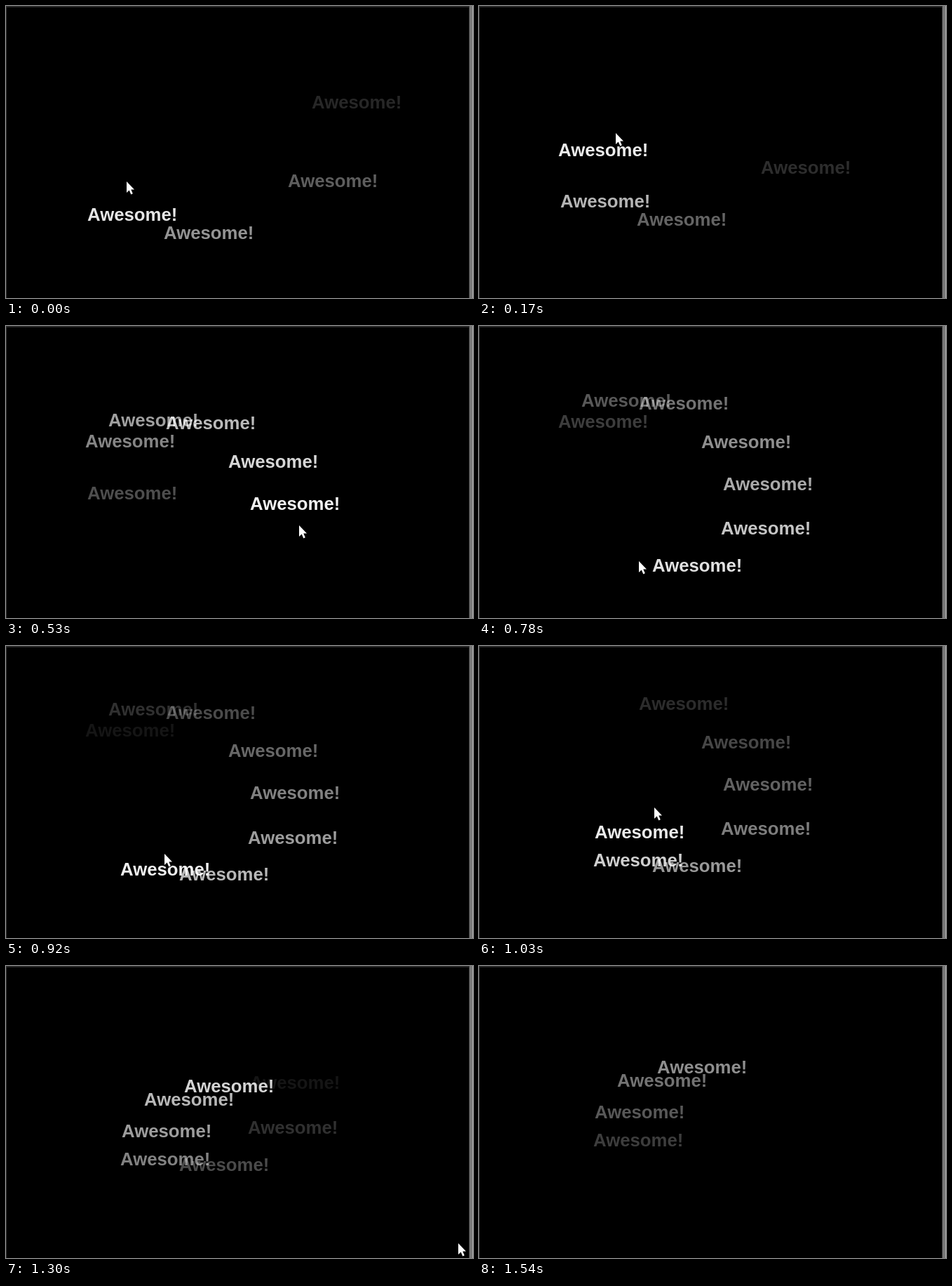
An HTML page with a canvas for the animation above (1570 ms loop, 666 by 416 pixels).

```html
<!DOCTYPE html>
<html lang="en">
<head>
<meta charset="utf-8">
<title>Awesome trail</title>
<style>
  html, body { margin: 0; width: 100%; height: 100%; overflow: hidden; background: #000; }
  canvas { display: block; }
</style>
</head>
<body>
<canvas id="stage" width="666" height="416"></canvas>
<script>
const ctx = document.getElementById('stage').getContext('2d');
const LOOP = 1570, BEAT = 95, OFFSET = 10;
const LIFE = 888, RISE = 100, FAINTEST = 0.07, HALF_WORD = 64, RIGHT_EDGE = 660;

// The pointer passes one point per beat, starting one beat before zero
const path = [
  [180, 307], [172, 245], [177, 212], [210, 171], [292, 165], [381, 209],
  [412, 258], [409, 311], [311, 353], [232, 336], [227, 324], [229, 273],
  [261, 218], [318, 188], [600, 322], [650, 430]
];
const timeOf = beat => OFFSET + beat * BEAT;

// Slower words still fading as the loop starts: one every second beat
const words = [[500, 222], [466, 312], [289, 365]]
  .map(([x, y], i) => ({ x, y, born: timeOf(2 * i - 8) }));

// The pointer drops a word on each beat but every eighth, if the word fits
path.forEach(([x, y], i) => {
  const beat = i - 1;
  if (beat % 8 && x + HALF_WORD < RIGHT_EDGE) words.push({ x, y, born: timeOf(beat) });
});

const arrow = new Path2D('M0 0V16L3.7 12.6L6.3 18.4L8.8 17.3L6.3 11.6H11Z');

// Catmull-Rom curve through the path, resting at its ends
function pointerAt(ms) {
  const s = (ms - OFFSET) / BEAT + 1, i = Math.floor(s), u = s - i;
  const point = n => path[Math.min(Math.max(n, 0), path.length - 1)];
  const [a, b, c, d] = [-1, 0, 1, 2].map(n => point(i + n));
  return [0, 1].map(k => b[k] + u / 2 * (c[k] - a[k]
    + u * (2 * a[k] - 5 * b[k] + 4 * c[k] - d[k]
    + u * (3 * (b[k] - c[k]) + d[k] - a[k]))));
}

function rect(color, x, y, w, h) {
  ctx.fillStyle = color;
  ctx.fillRect(x, y, w, h);
}

function drawWindow() {
  rect('#000', 0, 0, 666, 416);
  rect('#262626', 0, 0, 661, 2);
  rect('#303030', 0, 0, 1, 416);
  rect('#333', RIGHT_EDGE, 0, 1, 416);
  rect('#777', 661, 0, 4, 416);
  rect('#aaa', 665, 0, 1, 416);
}

function drawWords(ms) {
  ctx.font = 'bold 25.75px "Liberation Sans", Arial, sans-serif';
  ctx.fillStyle = '#fff';
  for (const { x, y, born } of words) {
    const age = (ms - born) / LIFE;
    if (age < 0 || 1 - age < FAINTEST) continue;
    ctx.globalAlpha = 1 - age;
    ctx.fillText('Awesome!', x - HALF_WORD, Math.round(y - RISE * age) + 9);
  }
  ctx.globalAlpha = 1;
}

function drawPointer(ms) {
  const [x, y] = pointerAt(ms);
  ctx.save();
  ctx.translate(Math.round(x), Math.round(y));
  ctx.strokeStyle = '#000';
  ctx.lineWidth = 2;
  ctx.stroke(arrow);
  ctx.fillStyle = '#fff';
  ctx.fill(arrow);
  ctx.restore();
}

function draw() {
  const ms = performance.now() % LOOP;
  drawWindow();
  drawWords(ms);
  drawPointer(ms);
  requestAnimationFrame(draw);
}
draw();
</script>
</body>
</html>
```
